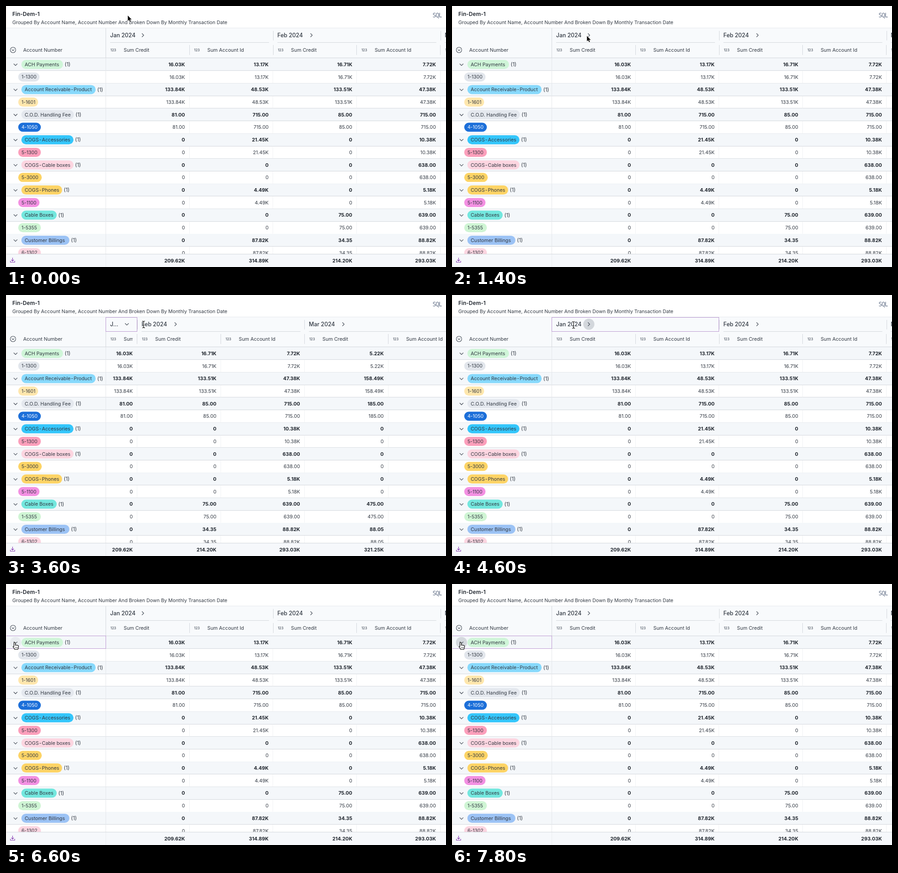
An HTML page with a canvas for the animation above (8000 ms loop, 972 by 576 pixels).

```html
<!DOCTYPE html>
<html lang="en">
<head>
<meta charset="utf-8">
<title>Fin-Dem-1</title>
<style>
html, body { margin: 0; width: 100%; height: 100%; overflow: hidden; background: #fff }
canvas { display: block }
</style>
</head>
<body>
<canvas id="stage" width="972" height="576"></canvas>
<script>
const ctx = document.getElementById('stage').getContext('2d');
const LOOP = 8000, STEP = 200;
const LEFT = 220.3, MONTH = 369.6, NARROW = 69.5, TOP = 115.1, ROW = 27.71, FOOT = 548;
const INK = '#333a44', DARK = '#20262e', LINE = '#d3d7dc', PURPLE = '#bb98d1';

// name, colour, pill width, code, colour, pill width, values by column
const groups = [
  ['ACH Payments', '#cff5d8', 92, '1-1300', '#e2e6ec', 47, '16.03K 13.17K 16.71K 7.72K 5.22K'],
  ['Account Receivable-Product', '#87d9fc', 164, '1-1601', '#ffe7ad', 44, '133.84K 48.53K 133.51K 47.38K 158.49K'],
  ['C.O.D. Handling Fee', '#e4e8ee', 116, '4-1050', '#1c6fd9', 50, '81.00 715.00 85.00 715.00 185.00'],
  ['COGS-Accessories', '#34c6fb', 115, '5-1300', '#fc9fbb', 50, '0 21.45K 0 10.38K 0'],
  ['COGS-Cable boxes', '#fcd5e0', 115, '5-3000', '#fdd466', 52, '0 0 0 638.00 0'],
  ['COGS-Phones', '#fdd466', 90, '5-1100', '#f390e2', 47, '0 4.49K 0 5.18K 0'],
  ['Cable Boxes', '#73e7de', 78, '1-5355', '#cff5d4', 50, '0 0 75.00 639.00 475.00'],
  ['Customer Billings', '#9cc3f5', 106, '6-1302', '#fcd5e0', 50, '0 87.82K 34.35 88.82K 88.05'],
];
const totals = '209.62K 314.89K 214.20K 293.03K 321.25K';
const months = [['Jan 2024', 82], ['Feb 2024', 84.7], ['Mar 2024', 85.7]];

// time, x, y of the pointer
const track = [[0, 269, 21], [1000, 296, 62], [1200, 296, 62], [1400, 298, 66], [1800, 305, 64],
  [2800, 305, 64], [3000, 304, 65], [3600, 304, 65], [4000, 268, 64], [4400, 268.5, 66],
  [4600, 268.5, 66], [6400, 19, 129], [LOOP, 19, 129]];
const arrow = new Path2D('M0 0V12l2.8-2.6 2 4.4 2-.9-2-4.2H8.6z');
const hand = new Path2D('M-1.5 9V1.2a1.5 1.5 0 0 1 3 0V6q1.5-1.2 2.6.3q1.6-1 2.5.5q1.9-.6 2 1.2v2.6q0 3-1.6 4.9H.3q-1-2.5-3.6-5.3q-.6-1.6 1.8-1.2z');
const beam = new Path2D('M-3-7.5Q0-7.5 0-5.5Q0-7.5 3-7.5M0-5.5V5.5M-3 7.5Q0 7.5 0 5.5Q0 7.5 3 7.5M-1.5 2h3');

function rect(x, y, w, h, color) {
  ctx.fillStyle = color;
  ctx.fillRect(x, y, w, h);
}
const hline = (x, y, w, color = LINE) => rect(x, Math.round(y), w, 1, color);
const vline = (x, y, h, color = LINE) => rect(Math.round(x), y, 1, h, color);

function text(str, x, y, { size = 10.8, weight = 400, color = INK, align = 'left', font = 'Inter', spacing = 0 } = {}) {
  ctx.font = `${weight} ${size}px ${font}, sans-serif`;
  ctx.letterSpacing = spacing + 'px';
  ctx.textAlign = align;
  ctx.fillStyle = color;
  ctx.fillText(str, x, y + size * .364);
}

function stroke(path, x, y, color = '#4a525d', width = 1.2) {
  ctx.save();
  ctx.translate(x, y);
  ctx.strokeStyle = color;
  ctx.lineWidth = width;
  ctx.stroke(typeof path === 'string' ? new Path2D(path) : path);
  ctx.restore();
}
const chevronDown = (x, y) => stroke('M-4-2L0 2L4-2', x, y);
const chevronRight = (x, y) => stroke('M-2-4L2 0L-2 4', x, y);

function focusBox(x, y, right, bottom) {
  ctx.strokeStyle = PURPLE;
  ctx.lineWidth = 1;
  ctx.strokeRect(x + .5, y + .5, right - x, bottom - y);
}

function disc(x, y, color) {
  ctx.fillStyle = color;
  ctx.beginPath();
  ctx.arc(x, y, 12.3, 0, 7);
  ctx.fill();
}

function pill(label, x, y, w, fill, style) {
  ctx.fillStyle = fill;
  ctx.beginPath();
  ctx.roundRect(x, y - 10, w, 20, 10);
  ctx.fill();
  text(label, x + 7.2, y, style);
}

function clipped(x, y, w, h, draw) {
  ctx.save();
  ctx.beginPath();
  ctx.rect(x, y, w, h);
  ctx.clip();
  draw();
  ctx.restore();
}

function layout(folded) {
  const first = folded ? NARROW : MONTH;
  const starts = [LEFT, LEFT + first, LEFT + first + MONTH];
  const columns = starts.flatMap((x, m) => folded && !m
    ? [{ x, w: NARROW, index: 0 }]
    : [0, 1].map(k => ({ x: x + k * MONTH / 2, w: MONTH / 2, index: m * 2 + k })));
  return { starts, columns };
}

function values(list, columns, y, weight) {
  const cells = list.split(' ');
  for (const { x, w, index } of columns)
    if (cells[index]) text(cells[index], x + w - 9.8, y, { weight, align: 'right', color: weight > 400 ? DARK : INK });
}

function body(t, columns) {
  const shut = t >= 6800 && t < 7600;
  let y = TOP;
  groups.forEach(([name, fill, w, code, codeFill, codeW, list], g) => {
    const mid = y + ROW / 2;
    rect(0, y, 972, ROW, '#f4f7fa');
    hline(0, y + ROW - .5, 972);
    if (!g && t >= 6400) disc(21, mid, t < 6800 ? '#e9ecf0' : '#d5d9de');
    (shut && !g ? chevronRight : chevronDown)(21, mid + .5);
    pill(name.replace('-', '\u200a-\u200a'), 34, mid, w, fill);
    text('(1)', 34 + w + 3.5, mid, { size: 11.5 });
    values(list, columns, mid, 700);
    y += ROW;
    if (shut && !g) return;
    hline(0, y + ROW - .5, 972);
    pill(code, 27, mid + ROW, codeW, codeFill, { size: 10.5, color: codeFill === '#1c6fd9' ? '#fff' : INK });
    for (const c of columns) vline(c.x + c.w - .5, y + .5, ROW - 1, '#f0f2f4');
    values(list, columns, mid + ROW, 400);
    y += ROW;
  });
  rect(0, y + .5, 972, ROW, '#f4f7fa');
  vline(LEFT - .3, 115, FOOT - 115, '#e4e7eb');
}

function header(t, folded, { starts, columns }) {
  rect(0, 48, 972, 66, '#f8fafc');
  hline(0, 48, 972, '#e6e9ed');
  hline(0, 114, 972);
  vline(LEFT, 49, 65);
  stroke('M6 0A6 6 0 1 1-6 0A6 6 0 1 1 6 0M-2.6-1L0 1.6L2.6-1', 15.5, 97, '#4a525d', 1.1);
  text('Account Number', 38, 97);

  for (const { x, w, index } of columns) {
    text('123', x + 10.5, 97, { size: 7.4, weight: 600, color: '#59616c' });
    clipped(x, 82, w - 9.8, 30, () => text(index % 2 ? 'Sum Account Id' : 'Sum Credit', x + 39.7, 97));
    vline(x + w - .4, 86, 22);
  }
  starts.forEach((x, m) => {
    const narrow = folded && !m, [label, offset] = months[m];
    const cx = x + (narrow ? 46.7 : offset);
    if (!m) {
      if (t >= 1800 && t < 3000 || t >= 3800 && t < 4400) disc(cx, 64.5, '#e9ecf0');
      if (t >= 4400 && t < 6400) disc(cx, 64.5, '#d3d7dc');
    }
    text(narrow ? 'J...' : label, x + 9.7, 64.5, { size: 12.4, weight: 500 });
    (narrow ? chevronDown : chevronRight)(cx, 64.5);
    if (!narrow) hline(x + 9.7, 80, MONTH - 18.6);
    if (m) vline(x, 55, 21);
  });
  if (t >= 3000 && t < 6400) focusBox(220, 49, Math.round(starts[1]) - 1, 80);
}

function pointer(t) {
  const i = Math.max(1, track.findIndex(k => k[0] >= t));
  const [t0, x0, y0] = track[i - 1], [t1, x1, y1] = track[i];
  const p = (t - t0) / (t1 - t0), e = p * p * (3 - 2 * p);
  const x = x0 + (x1 - x0) * e, y = y0 + (y1 - y0) * e;
  if (t >= 3000 && t < 3800 || t >= 4400 && t < 4800) {
    stroke(beam, x, y, '#fff', 3.2);
    stroke(beam, x, y, '#111', 1.2);
    return;
  }
  const isHand = t >= 1800 && t < 4400 || t >= 6400;
  const shape = isHand ? hand : arrow;
  if (!isHand) stroke(shape, x, y, '#fff', 1.8);
  ctx.save();
  ctx.translate(x, y);
  ctx.fillStyle = isHand ? '#fff' : '#111';
  ctx.fill(shape);
  ctx.restore();
  if (isHand) {
    stroke(shape, x, y, '#111', 1.2);
    stroke('M2 10v3.5M4.2 10v3.5M6.4 10v3.5', x, y, '#333', .8);
  }
}

function draw(t) {
  const folded = t >= 3000 && t < 4400;
  const grid = layout(folded);
  rect(0, 0, 972, 576, '#fff');
  text('Fin-Dem-1', 14, 17.5, { size: 12, weight: 600, color: DARK });
  text('Grouped By Account Name, Account Number And Broken Down By Monthly Transaction Date', 14, 36.3, { size: 10.77 });
  text('SQL', 942, 19.8, { size: 13.5, color: '#66738a', font: 'Noto Sans Mono', spacing: -1.2 });

  clipped(0, 115, 972, FOOT - 115, () => body(t, grid.columns));
  header(t, folded, grid);
  if (t >= 6400) focusBox(0, 114, 220, 142);

  rect(0, FOOT, 972, 28, '#f6f8fb');
  hline(0, FOOT - 1, 972);
  vline(LEFT - .3, FOOT, 28, '#eceef1');
  values(totals, grid.columns, 562, 700);
  stroke('M0-5.5V1.5M-2.8-1L0 1.8L2.8-1M-4.8 1.5V4.5H4.8V1.5', 14.5, 561, '#8a45b5', 1.2);
  vline(0, 0, 576, '#f8ebe3');
  pointer(t);
}

function tick() {
  const t = performance.now() % LOOP;
  draw(Math.floor(t / STEP) * STEP);
  requestAnimationFrame(tick);
}
tick();
</script>
</body>
</html>
```
